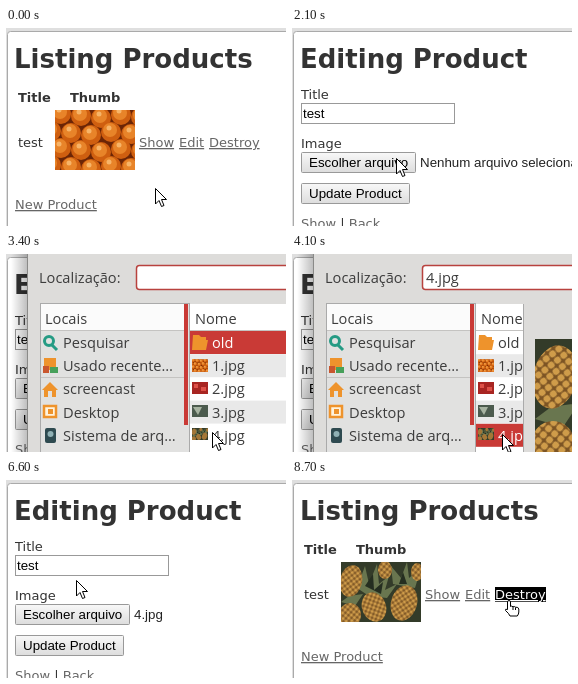
An HTML page for the animation above (8.8 s loop, 280 by 198 pixels).

```html
<!DOCTYPE html>
<html lang="pt">
<head>
<meta charset="utf-8">
<title>Products</title>
<style>
html, body { margin: 0; width: 100%; height: 100%; overflow: hidden; background: #fff }
svg { display: block }
text { font: 13px "DejaVu Sans", sans-serif; fill: #333; white-space: pre }
.h1 { font-size: 26px; font-weight: bold }
.b { font-weight: bold }
.link { fill: #666; text-decoration: underline }
.hot .link { fill: #fff }
.hot rect { fill: #000 }
.ui { font: 13.33px "Liberation Sans", Arial, sans-serif; fill: #000 }
.gtk text { font: 14.6px "Open Sans", sans-serif; fill: #3c3c3c }
.gtk .odd rect { fill: #e9e9e9 }
.gtk .on rect { fill: #c93a36 }
.gtk .on text { fill: #fff }
.btn rect { fill: url(#face); stroke: #999 }
.btn.down rect { fill: #ccc; stroke: #777 }
</style>
</head>
<body>
<svg width="280" height="198" viewBox="0 0 280 198">
<defs>
  <linearGradient id="face" x2="0" y2="1"><stop stop-color="#f8f8f8"/><stop offset="1" stop-color="#ddd"/></linearGradient>
  <linearGradient id="shade"><stop stop-opacity="0"/><stop offset="1" stop-opacity=".25"/></linearGradient>
  <pattern id="skin" width="4" height="4" patternUnits="userSpaceOnUse" patternTransform="rotate(40)">
    <rect width="4" height="4" fill="#7c5424"/><circle cx="2" cy="2" r="1.700" fill="#cf9c4a"/>
  </pattern>
  <clipPath id="names"><rect id="namesBox" x="184" y="50" height="148"/></clipPath>
  <symbol id="oranges" viewBox="0 0 80 60"><rect width="80" height="60" fill="#6b2506"/><g id="fruit"/></symbol>
  <symbol id="pines" viewBox="0 0 80 60">
    <rect width="80" height="60" fill="#333b29"/>
    <path d="M16 26L24 4 28 22 36 2 38 22 48 14 44 28 56 22 46 36 28 34zM52 22L50 4 60 16 66 0 68 16 80 6 74 26zM0 40L8 34 22 32 14 44z" fill="#69764f"/>
    <path d="M24 24L32 12 33 28 42 20 40 32zM58 22L62 10 66 22z" fill="#252e20"/>
    <g fill="url(#skin)">
      <ellipse cx="10" cy="19" rx="11" ry="16" transform="rotate(12 10 19)"/>
      <ellipse cx="9" cy="53" rx="11" ry="12"/>
      <ellipse cx="33" cy="45" rx="12" ry="15" transform="rotate(-20 33 45)"/>
      <ellipse cx="63" cy="41" rx="13" ry="18" transform="rotate(16 63 41)"/>
      <ellipse cx="44" cy="8" rx="7" ry="9"/>
      <ellipse cx="76" cy="10" rx="6" ry="9"/>
    </g>
  </symbol>
</defs>

<rect width="280" height="198" fill="#dfdfdf"/>
<path d="M1.500 200V6.500q0-3 3-3H282V200z" fill="#fff" stroke="#aaa"/>

<g id="list">
  <text class="h1" x="8" y="40">Listing Products</text>
  <text class="b" x="12" y="74">Title</text>
  <text class="b" x="64" y="74">Thumb</text>
  <text x="12" y="119">test</text>
  <use id="thumb" x="49" y="82" width="80" height="60"/>
  <text class="link" x="133" y="119">Show</text>
  <g id="editLink"><rect x="173" y="107" width="25" height="15" fill="none"/><text class="link" x="173" y="119">Edit</text></g>
  <g id="destroy"><rect x="203" y="107" width="51" height="15" fill="none"/><text class="link" x="203" y="119">Destroy</text></g>
  <text class="link" x="9" y="181">New Product</text>
</g>

<g id="edit">
  <text class="h1" x="8" y="40">Editing Product</text>
  <text x="9" y="71">Title</text>
  <rect x="9.500" y="75.500" width="153" height="20" fill="#fff" stroke="#999"/>
  <text class="ui" x="11" y="90">test</text>
  <text x="9" y="120">Image</text>
  <g class="btn" id="choose"><rect x="9.500" y="124.500" width="114" height="20" rx="1"/><text class="ui" x="17" y="139">Escolher arquivo</text></g>
  <text class="ui" id="file" x="128" y="139" style="fill:#222"></text>
  <g class="btn" id="update"><rect x="9.500" y="155.500" width="108" height="20" rx="1"/><text class="ui" x="17" y="170">Update Product</text></g>
  <text x="9" y="200"><tspan class="link">Show</tspan> | <tspan class="link">Back</tspan></text>
</g>

<g id="show">
  <text x="9" y="30" style="fill:green">Product was successfully updated.</text>
  <text x="9" y="61"><tspan class="b">Title:</tspan> test</text>
  <text x="9" y="92"><tspan class="link">Edit</tspan> | <tspan class="link">Back</tspan></text>
</g>

<g id="dialog" class="gtk">
  <rect x="5" width="16" height="198" fill="url(#shade)"/>
  <rect x="21" width="259" height="198" fill="#dddcda"/>
  <path d="M21.500 0V198" stroke="#8a8a88"/>
  <text x="33" y="29">Localização:</text>
  <rect x="130.500" y="11.500" width="160" height="24" rx="3" fill="#fff" stroke="#b8423e" stroke-width="1.500"/>
  <text id="path" x="134" y="29">4.jpg</text>
  <path id="caret" d="M135.500 15V32" stroke="#222"/>
  <rect x="34.500" y="49.500" width="149" height="160" fill="#e1e1e0" stroke="#aaa"/>
  <path d="M35 50H178V76H35z" fill="#fbfbfb"/>
  <path d="M35 76.500H178M35 123.500H178" stroke="#c4c3c1"/>
  <rect x="178" y="50" width="4" height="121" fill="#c93a36"/>
  <text x="39" y="70">Locais</text>
  <g id="places"></g>
  <circle cx="43" cy="87" r="4.500" fill="none" stroke="#259b84" stroke-width="3"/>
  <path d="M46 91L51 96" stroke="#259b84" stroke-width="3"/>
  <path d="M38 104H50V116H38z" fill="#ee932c"/><path d="M37 112H43V119H37z" fill="#c9562e"/><path d="M44 113H52V119H44z" fill="#47a05a"/>
  <path d="M36 136L44 128 52 136H50V143H46V137H42V143H38V136z" fill="#ee932c"/>
  <path d="M38 152H50V163H38z" fill="#fff3de" stroke="#ee932c" stroke-width="2.500"/>
  <path d="M42 155H47V160H42z" fill="#ee932c"/>
  <rect x="39" y="174" width="11" height="15" rx="2" fill="#2e4a50"/><circle cx="44.500" cy="180" r="3" fill="#8fb0b4"/>
  <g clip-path="url(#names)">
    <rect x="184" y="50" width="96" height="148" fill="#fff"/>
    <path d="M184 76.500H280" stroke="#c4c3c1"/>
    <text x="189" y="70">Nome</text>
    <g id="files"></g>
    <path d="M187 81H193L195 83H200V86H202L200 96H186z" fill="#ee932c"/>
    <use href="#oranges" x="186" y="105" width="16" height="13"/>
    <rect x="186" y="128" width="16" height="12" fill="#a82522"/><path d="M188 130h4v4h-4zM195 133h5v4h-5z" fill="#dd5148"/>
    <rect x="186" y="151" width="16" height="12" fill="#4c5b4e"/><path d="M187 153H196L192 161z" fill="#a7b3a1"/>
    <use href="#pines" x="186" y="174" width="16" height="12"/>
  </g>
  <path id="edge" d="M231.500 50V198" stroke="#aaa"/>
  <use id="preview" href="#pines" x="243" y="85" width="160" height="120"/>
</g>

<g id="cursor" stroke="#000" fill="#fff" stroke-linejoin="round">
  <path id="arrow" d="M.5 .5V16L4 12.500 6.500 18.500 9 17.500 6.500 11.500H11.500z"/>
  <g id="hand" transform="translate(-6 0)">
    <path d="M3.500 9.500V2a1.500 1.500 0 0 1 3 0V6.500q1.300-1 2.500 .3 1.300-.8 2.500 .4 2.900-.4 3.300 1.800V12q0 2-1.500 4H6q-1-2.500-4.500-5.500-.6-2 2-1z"/>
    <path d="M9 7V10M11.500 7.500V10" fill="none"/>
  </g>
</g>
</svg>

<script>
const $ = id => document.getElementById(id);
const see = (id, on) => $(id).style.display = on ? "" : "none";

// a loose pile of oranges in offset rows
let fruit = "";
for (let row = 0; row < 4; row++)
  for (let col = 0; col < 5; col++) {
    const x = col * 20 + (row % 2 ? -4 : 6), y = row * 17 + 4 + col * 7 % 5;
    fruit += `<circle cx="${x}" cy="${y}" r="10" fill="#cf5f10"/><circle cx="${x - 1}" cy="${y - 2}" r="7" fill="#e88429"/><circle cx="${x - 2}" cy="${y - 4}" r="2.500" fill="#f7b468"/>`;
  }
$("fruit").innerHTML = fruit;

const rowY = i => 94 + i * 23.2;
$("places").innerHTML = ["Pesquisar", "Usado recente…", "screencast", "Desktop", "Sistema de arq…"]
  .map((s, i) => `<text x="57" y="${rowY(i)}">${s}</text>`).join("");
$("files").innerHTML = ["old", "1.jpg", "2.jpg", "3.jpg", "4.jpg"]
  .map((s, i) => `<g class="${i % 2 ? "odd" : ""}"><rect x="184" y="${rowY(i) - 17}" width="96" height="23" fill="none"/><text x="206" y="${rowY(i)}">${s}</text></g>`).join("");
const files = $("files").children;

// time, x, y of the pointer tip
const track = [
  [0, 149, 160], [800, 175, 115], [1200, 175, 115], [1800, 104, 130],
  [2600, 104, 130], [3500, 210, 180], [5200, 210, 180], [5800, 72, 160], [6200, 72, 160],
  [6600, 70, 100], [6800, 66, 84], [7100, 66, 84], [7200, 70, 86], [7300, 70, 86],
  [7600, 78, 84], [7700, 78, 84], [7800, 100, 119], [7900, 100, 119], [8200, 218, 120], [8800, 218, 120]
];
function tip(t) {
  const i = track.findIndex(k => k[0] > t), [t0, x0, y0] = track[i - 1], [t1, x1, y1] = track[i];
  const p = (t - t0) / (t1 - t0), e = p * p * (3 - 2 * p);
  return [Math.round(x0 + (x1 - x0) * e), Math.round(y0 + (y1 - y0) * e)];
}

function draw(now) {
  const t = Math.floor(now % 8800 / 100) * 100;
  const within = (a, b) => t >= a && t < b;
  const picked = t >= 3800;

  see("list", t < 1100 || t >= 7400);
  see("edit", within(1100, 6900));
  see("show", within(6900, 7400));
  see("dialog", within(2200, 4700));
  $("thumb").setAttribute("href", t < 1100 ? "#oranges" : "#pines");
  $("editLink").classList.toggle("hot", within(800, 1100));
  $("destroy").classList.toggle("hot", t >= 8200);
  $("choose").classList.toggle("down", within(1900, 2100));
  $("update").classList.toggle("down", t === 6000);
  $("file").textContent = t < 4700 ? "Nenhum arquivo selecionado" : "4.jpg";

  see("path", picked);
  see("caret", !picked && t % 1200 < 600);
  see("edge", picked);
  see("preview", picked);
  $("namesBox").setAttribute("width", picked ? 47 : 96);
  files[0].classList.toggle("on", !picked);
  files[4].classList.toggle("on", picked);

  const hand = within(800, 1300) || within(7200, 7400) || t >= 8200;
  see("hand", hand);
  see("arrow", !hand);
  $("cursor").setAttribute("transform", `translate(${tip(t)})`);
}
const start = performance.now();
function loop() {
  draw(performance.now() - start);
  requestAnimationFrame(loop);
}
loop();
</script>
</body>
</html>
```
